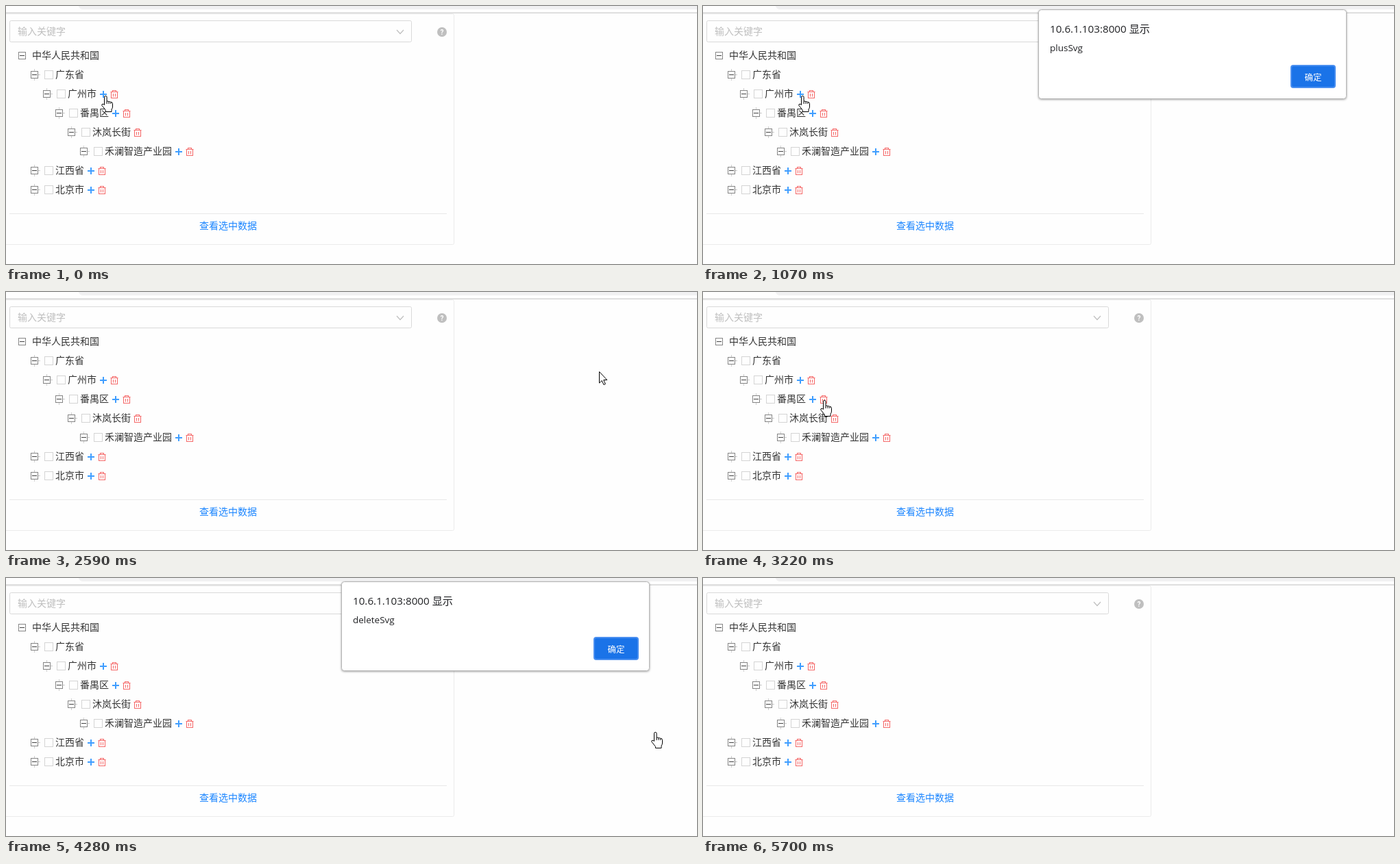
Write an HTML page that moves like this. It is 1008 by 377 pixels and loops after 7.07 s.

```html
<!DOCTYPE html>
<html lang="zh-CN">
<head>
<meta charset="utf-8">
<style>
  html, body { margin: 0; width: 100%; height: 100%; overflow: hidden; background: #fefefe; }
  svg { position: absolute; left: 0; top: 0; width: 1008px; height: 377px; }
  text { font: 14px "Noto Sans CJK SC", "Noto Sans CJK", sans-serif; fill: #333; }
  #dialog { transform-origin: 714px 71px; }
  #dialog rect.card { filter: drop-shadow(0 1px 1.5px rgba(0,0,0,.35)); }
  #dialog text { font-family: "Open Sans", "Noto Sans CJK SC", sans-serif; fill: #202124; }
</style>
</head>
<body>
<svg id="page" fill="none">
  <path d="M106 0Q107 5 113 5H1008V0Z" fill="#f1f1f2"/>
  <path d="M0 10H1008" stroke="#d4d4d4" stroke-width="1.4"/>
  <path d="M0 11.5H651.5Q653.5 11.5 653.5 13.5V346.5Q653.5 348.5 651.5 348.5H0" stroke="#ebebeb"/>
  <rect x="5.5" y="21.5" width="586" height="31" rx="2" stroke="#d9d9d9"/>
  <text x="17" y="42" style="fill:#bfbfbf">输入关键字</text>
  <path d="M570 35L575 40.5L580 35" stroke="#bfbfbf" stroke-width="1.2"/>
  <circle cx="636" cy="38" r="7" fill="#bfbfbf"/>
  <text x="636" y="42" text-anchor="middle" style="font:bold 10px Roboto,sans-serif;fill:#fff">?</text>
  <g id="tree"></g>
  <path d="M5 303.5H643" stroke="#e8e8e8"/>
  <text x="282" y="326" style="fill:#1a85ff">查看选中数据</text>
  <g id="tip">
    <rect x="156" y="148" width="49" height="21" fill="#000" opacity=".15"/>
    <rect x="154.5" y="146.5" width="48" height="20" fill="#fff" stroke="#888"/>
    <text x="160" y="161" style="font-size:12px;fill:#575757">广州市</text>
  </g>
</svg>

<svg id="dialog" fill="none">
  <rect class="card" x="489.5" y="5.5" width="449" height="130" rx="4" fill="#fff" stroke="#b4b4b4"/>
  <text x="506" y="39" style="font-size:15.2px">10.6.1.103:8000 显示</text>
  <text id="message" x="506" y="66" style="font-size:13.5px"></text>
  <clipPath id="clip"><rect x="857" y="86" width="66" height="34" rx="4"/></clipPath>
  <rect id="button" x="858" y="87" width="64" height="32" rx="3" stroke="#4a8ff0" stroke-width="2"/>
  <circle id="ripple" fill="#fff" opacity=".15" clip-path="url(#clip)"/>
  <text x="890" y="108.5" text-anchor="middle" style="font-size:12.5px;font-weight:500;fill:#fff">确定</text>
</svg>

<svg id="cursor" fill="#fff" stroke="#000" stroke-linejoin="round">
  <path id="hand" d="M4.5 13.5V2.2a1.8 1.8 0 0 1 3.6 0V8.5q1.8-1.2 3 .4q1.8-.8 2.8.6q2.4-.3 2.6 2V16q0 2.5-1.5 4V23.5H6.5V21.5Q4 18 1 14.5q-.8-2 1-2.3q1.2 0 2.5 1.3zM8.1 8.5V12M11.1 9V12M13.9 9.8V12"/>
  <path id="arrow" d="M.5 .5V17L4.3 13.5L7 19.5L9.4 18.4L6.8 12.5H11.8Z"/>
</svg>

<script>
const LOOP = 7070;
const $ = id => document.getElementById(id);

// depth, label, icons
const rows = [
  [0, '中华人民共和国', ''], [1, '广东省', ''], [2, '广州市', '+x'], [3, '番禺区', '+x'],
  [4, '沐岚长街', 'x'], [5, '禾澜智造产业园', '+x'], [1, '江西省', '+x'], [1, '北京市', '+x']
];
const icons = {
  '+': '<path d="M-5 0H5M0-5V5" stroke="#409eff" stroke-width="2"/>',
  'x': '<path d="M-5.5-3.5H5.5M-2.5-3.5V-5.5H2.5V-3.5M-4.5-3.5V5.5H4.5V-3.5M-1.5-1V3.5M1.5-1V3.5" stroke="#f56c6c" stroke-width="1.1"/>'
};

$('tree').innerHTML = rows.map(([depth, label, tools], i) => {
  const x = 18 + 18 * depth, y = 72 + 28 * i;
  const textX = depth ? x + 36 : 38, end = textX + 14 * label.length;
  const box = depth ? `<path d="M${x + 5.5} ${y - 8}v3m0 11v3M${x + 11} ${y + .5}h3" stroke="#ccc"/>
    <rect x="${x + 20.5}" y="${y - 5.5}" width="12" height="12" stroke="#d4d4d4"/>` : '';
  return `${box}<rect x="${x + .5}" y="${y - 4.5}" width="10" height="10" stroke="#858585"/>
    <path d="M${x + 2} ${y + .5}h7" stroke="#444"/>
    <text x="${textX}" y="${y + 5}">${label}</text>` +
    [...tools].map((k, n) => `<g transform="translate(${end + 10 + 16 * n} ${y + 1})">${icons[k]}</g>`).join('');
}).join('');

// time, shape, left, top
const moves = [
  [0, 'hand', 139, 131], [1350, 'hand', 300, 260], [1470, 'hand', 574, 352],
  [1620, 'hand', 905, 234], [1770, 'arrow', 896, 150], [1890, 'arrow', 887, 102],
  [2590, 'arrow', 865, 116], [2710, 'arrow', 329, 169], [2860, 'arrow', 232, 191],
  [2980, 'arrow', 195, 182], [3100, 'hand', 176, 165], [3220, 'hand', 171, 158],
  [3370, 'hand', 169, 155], [4010, 'hand', 430, 250], [4130, 'hand', 772, 283],
  [4280, 'hand', 941, 225], [4400, 'hand', 917, 180], [4550, 'arrow', 914, 125],
  [4670, 'arrow', 911, 106], [5700, '', 0, 0]
];
// time, opacity, tilt
const poses = [
  [0, 0, 0], [950, .35, 1], [1070, 1, 0], [2440, .35, 1], [2590, 0, 0],
  [3740, .35, 1], [3890, 1, 0], [5300, .7, .1], [5450, 0, 0]
];
const at = (list, t) => list.findLast(step => step[0] <= t);
const show = (id, on) => $(id).style.display = on ? '' : 'none';

function draw() {
  const t = performance.now() % LOOP;
  const [, shape, x, y] = at(moves, t);
  for (const id of ['hand', 'arrow']) {
    show(id, id === shape);
    $(id).setAttribute('transform', `translate(${x} ${y})`);
  }
  show('tip', t >= 400 && t < 680);

  const [, opacity, tilt] = at(poses, t);
  const second = t > 3000;
  show('dialog', opacity);
  $('dialog').style.opacity = opacity;
  $('dialog').style.transform = tilt
    ? `perspective(1000px) translateY(${-13 * tilt}px) rotateX(${9 * tilt}deg)` : 'none';
  $('message').textContent = second ? 'deleteSvg' : 'plusSvg';
  $('button').setAttribute('fill', t >= 5180 || t >= 1890 && !second ? '#2f7de1' : '#1a73e8');

  show('ripple', t >= 5180 || t >= 2320 && !second);
  const [cx, cy, r] = second ? [911, 106, 12] : [887, 102, 7];
  $('ripple').setAttribute('cx', cx);
  $('ripple').setAttribute('cy', cy);
  $('ripple').setAttribute('r', r);
  requestAnimationFrame(draw);
}
draw();
</script>
</body>
</html>
```
